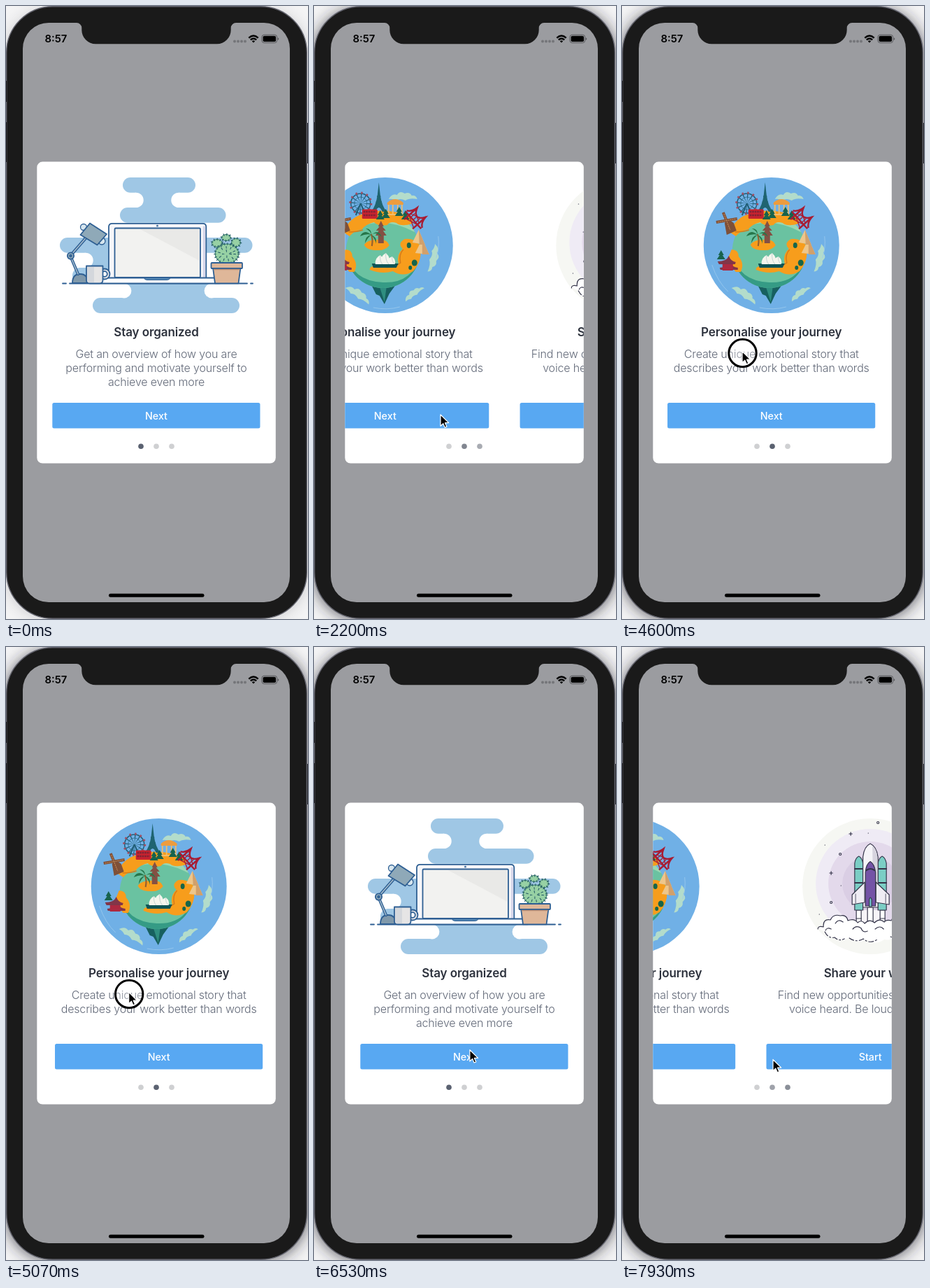
Animation of 432 by 876 pixels, one loop 8 s. Source, as an HTML page:

```html
<!DOCTYPE html>
<html lang="en">
<head>
<meta charset="utf-8">
<title>Onboarding cards</title>
<style>
html, body { margin: 0; width: 100%; height: 100%; overflow: hidden; background: #f4f4f5; }
svg { display: block; width: 100vw; height: 100vh; }
text { font-family: Inter, "Open Sans", sans-serif; text-anchor: middle; }
.title { font-size: 17px; font-weight: 600; fill: #2d323d; letter-spacing: -.1px; }
.body { font-size: 16px; font-weight: 300; fill: #626978; letter-spacing: -.18px; }
.label { font-size: 14.3px; font-weight: 500; fill: #fff; }
.ink { stroke: #2e5f93; stroke-width: 1.8; stroke-linejoin: round; stroke-linecap: round; }
.line { stroke: #35354a; stroke-width: 1.2; stroke-linejoin: round; stroke-linecap: round; }
</style>
</head>
<body>
<svg viewBox="0 0 432 876" preserveAspectRatio="none">
<defs>
  <clipPath id="card"><rect x="44.3" y="222.6" width="341.5" height="431" rx="8"/></clipPath>
  <clipPath id="globe"><circle cx="212" cy="350" r="53"/></clipPath>
  <filter id="soft" x="-20%" y="-20%" width="140%" height="140%"><feGaussianBlur stdDeviation="11"/></filter>
  <path id="tree" d="M0-9L4-2H2L6 4H-6L-2-2H-4Z" fill="#17634d"/>
  <path id="cloud" d="M-20 3Q-15-6-8-3Q-4-10 3-5Q10-8 13-2Q19-3 21 3Q10 1 4 5Q-4 1-9 5Q-14 2-20 3Z" fill="#b3dccb"/>
  <g id="cactus">
    <ellipse cx="302" cy="339" rx="7.500" ry="5.500"/><ellipse cx="315" cy="331" rx="6.500" ry="4.500"/>
    <ellipse cx="329" cy="338" rx="6.500" ry="6"/><ellipse cx="316" cy="354" rx="17" ry="14"/>
  </g>
</defs>

<rect width="432" height="876" fill="#f4f4f5"/>
<rect id="shadow" x="0" y="4" width="431" height="872" rx="66" fill="#23232c" filter="url(#soft)"/>
<path d="M431 167V225" stroke="#222227" stroke-width="3"/>
<rect x=".7" y=".7" width="429.6" height="874.6" rx="66" fill="#1a1a1a" stroke="#62636d" stroke-width="1.4"/>
<path d="M0 107V137M0 166V223" stroke="#17171a" stroke-width="2"/>
<rect x="24" y="24" width="382" height="828" rx="37" fill="#9b9ca0"/>
<path d="M101 23V24A7.300 7.300 0 0 1 108.300 31.300V34A20 20 0 0 0 128.300 54.300H301.700A20 20 0 0 0 321.700 34V31.300A7.300 7.300 0 0 1 329 24V23Z" fill="#1a1a1a"/>
<text x="71.5" y="52.2" font-size="14.8" font-weight="600">8:57</text>
<path d="M327 50.5H343" stroke="#747579" stroke-width="4" stroke-linecap="round" stroke-dasharray="0 5"/>
<g fill="none" stroke="#000" stroke-width="2.3">
  <path d="M347.3 45.6Q354 39.4 360.7 45.6M349.8 48.4Q354 44.6 358.2 48.4"/>
</g>
<path d="M351.8 50.2Q354 48.4 356.2 50.2L354 52.6Z"/>
<rect x="366" y="41.2" width="21.6" height="11.4" rx="3.2" fill="none" stroke="#55565a"/>
<rect x="367.6" y="42.8" width="18.4" height="8.2" rx="1.8"/>
<path d="M388.8 45V49Q390.3 48 390.3 47T388.8 45" fill="#55565a"/>
<rect x="147" y="839.8" width="136.5" height="5" rx="2.5"/>

<g clip-path="url(#card)">
<rect x="44" y="222" width="343" height="432" fill="#fff"/>
<g id="strip">

<g id="p0">
  <g fill="#9fc7e5">
    <rect x="167" y="245" width="104" height="21.8" rx="10.9"/>
    <rect x="186" y="266" width="61" height="23"/>
    <rect x="163" y="288" width="151.500" height="21.800" rx="10.9"/>
    <rect x="77" y="331" width="275.500" height="21.800" rx="10.9"/>
    <rect x="114" y="352" width="150" height="23"/>
    <rect x="95" y="374" width="160" height="22" rx="10.9"/>
    <rect x="169" y="396" width="125" height="22"/>
    <rect x="124" y="417" width="210" height="22" rx="11"/>
  </g>
  <g fill="#fff">
    <circle cx="186" cy="277.400" r="10.7"/><circle cx="247" cy="277.400" r="10.7"/>
    <circle cx="114" cy="363.400" r="10.7"/>
    <circle cx="169" cy="407" r="10.4"/><circle cx="294" cy="407" r="10.4"/>
  </g>
  <g class="ink" fill="none">
    <path d="M81 396.500H86M91 396.500H345M350 396.500H353"/>
    <path d="M95 396Q95 383 106 383T117 396Z" fill="#8099ab"/>
    <path d="M103 383L92 357L119 326" stroke-width="4.2"/>
    <path d="M103 383L92 357L119 326" stroke="#a9bfce" stroke-width="1.5"/>
    <circle cx="92.500" cy="357" r="4.600" fill="#8fa9b8"/><circle cx="92.500" cy="357" r="1.300"/>
    <circle cx="111" cy="316" r="4.500" fill="#d6e5ee" stroke-width="1.3"/>
    <circle cx="137" cy="336" r="5" fill="#d6e5ee" stroke-width="1.3"/>
    <path d="M120 310.500L144 326L130.500 341.500L106.500 327Z" fill="#8fa9b8"/>
    <path d="M147 389V315.500Q147 310.800 152 310.800H281.500Q286.300 310.800 286.300 315.500V389Z" fill="#f7f7fa"/>
    <path d="M283.300 388V316" stroke="#d6d5e9" stroke-width="3"/>
    <rect x="155.500" y="317.500" width="122.500" height="70.500" rx="1.500" fill="#ededeb"/>
    <path d="M157 319H192L276 364V387H157Z" fill="#f2f2f0" stroke="none"/>
    <path d="M192 319H276V363Z" fill="#e9e9e7" stroke="none"/>
    <circle cx="216.500" cy="314.200" r=".5"/>
    <path d="M120 388.500H313Q313 396.300 305 396.300H120Z" fill="#fff"/>
    <path d="M197.500 388.500H235Q234 391.500 230 391.500H202Q198 391.500 197.500 388.500Z" fill="#5588b5" stroke-width="1"/>
    <circle cx="141" cy="383" r="7.500" fill="#dfe0e4"/><circle cx="141" cy="383" r="3.800" fill="#fff"/>
    <path d="M115 371.500H138.500V392Q138.500 396.300 134 396.300H119Q115 396.300 115 392Z" fill="#e6e5e5"/>
    <path d="M116.500 373H126V395H119Q116.500 395 116.500 392Z" fill="#d4d7dc" stroke="none"/>
  </g>
  <use href="#cactus" fill="#97d1a4" stroke="#2f7568" stroke-width="1"/>
  <g fill="none" stroke="#1f5563" stroke-width="3.600" stroke-dasharray="1 3.300">
    <use href="#cactus"/>
    <g stroke-dasharray="1 5.500"><ellipse cx="316" cy="354" rx="11" ry="9"/><ellipse cx="316" cy="354" rx="5" ry="4"/></g>
  </g>
  <g class="ink" fill="#dfb799">
    <path d="M296 374H335.500L332.500 396.300H299Z"/><rect x="293.500" y="367" width="44.500" height="8" rx="1"/>
    <path d="M297.500 376.500H334" stroke="#b98d73" stroke-width="1.500"/>
  </g>
</g>

<g id="p1">
  <circle cx="215" cy="342" r="97" fill="#70b0e6"/>
  <use href="#cloud" x="240" y="273"/>
  <use href="#cloud" transform="translate(284 360) rotate(105)"/>
  <use href="#cloud" transform="translate(176 412) rotate(35)"/>
  <use href="#cloud" transform="translate(256 411) rotate(-35) scale(.8)"/>
  <g fill="none" stroke="#9ccbee" stroke-width=".8">
    <path d="M130 370Q138 394 153 408M198 431Q218 435 236 430M291 329Q293 345 288 360"/>
  </g>
  <path d="M194 396H232L221 411L214 426L207 414L202 412Z" fill="#17605f"/>
  <path d="M207 401L214 423L217 401Z" fill="#2f8e80"/>
  <circle cx="212" cy="350" r="53" fill="#6ac2a1"/>
  <g clip-path="url(#globe)">
    <path d="M160 355Q168 393 212 395T266 352V404H158Z" fill="#359b85"/>
    <path d="M165 320Q212 298 257 323V290H165Z" fill="#9bd7b2"/>
  </g>
  <g fill="#f79d1c">
    <path d="M155 323Q164 302 184 297Q214 287 246 299Q256 304 254 311Q238 316 231 310Q222 307 218 313Q205 315 199 309Q187 312 182 319Q171 321 164 329Z"/>
    <path d="M185 341Q190 334 202 334Q218 332 221 342Q215 350 203 349Q188 349 185 341Z"/>
    <path d="M243 333Q256 331 265 342Q269 364 255 379Q241 388 226 379Q211 384 193 377Q192 371 207 371Q227 375 234 368Q231 355 240 347Q232 339 243 333Z"/>
    <path d="M158 348Q168 348 168 358Q177 368 171 380L164 380Q154 370 154 358Z"/>
  </g>
  <path d="M163 323Q175 323 183 320M241 348Q234 355 237 367Q227 375 212 373" fill="none" stroke="#d57b19" stroke-width="1.500"/>
  <g fill="none" stroke="#225f77">
    <circle cx="180" cy="282" r="14" stroke-width="1.500"/>
    <circle cx="180" cy="282" r="9" stroke-width=".7"/>
    <circle cx="180" cy="282" r="7" stroke-width="14" stroke-dasharray=".800 2.865"/>
    <circle cx="180" cy="282" r="15" stroke="#a34c60" stroke-width="3" stroke-dasharray="2.500 5.354"/>
    <path d="M180 282L173 299M180 282L187 299" stroke-width="2"/>
  </g>
  <path d="M206 252L208 270Q210 285 217 294H211Q206 282 201 294H195Q202 285 204 270Z" fill="#1f6470"/>
  <path d="M202 280H210M203.500 272H208.500" stroke="#1f6470" stroke-width="2"/>
  <path d="M218 281Q229 271 241 281V284H218Z" fill="#ed9c3e"/>
  <path d="M220 284V297M226 284V297M233 284V297M239 284V297M217 298H242" stroke="#f1bd6d" stroke-width="1.800"/>
  <rect x="182" y="290.500" width="22" height="13.500" rx="1.500" fill="#c7232f"/>
  <path d="M184 294H202M184 299H202" stroke="#7f2334" stroke-width="2.300" stroke-dasharray="2.500 1"/>
  <use href="#tree" x="235" y="296"/><use href="#tree" x="216" y="299"/><use href="#tree" x="208" y="301"/><use href="#tree" x="244" y="301"/>
  <g transform="translate(258 303) rotate(48)" fill="none" stroke="#a81c33" stroke-width="2.400">
    <path d="M-16 4H17M-9-13V13M9-13V13M-16 2Q-10-2-9-12Q0 6 9-12Q10-2 17 2"/>
    <path d="M-9-8L9 1M-9 1L9-8M-9 11L9 4M-9 4L9 11M-5-4V4M0-2V4M5-4V4" stroke-width="1.300"/>
  </g>
  <g fill="#7e5038">
    <path d="M148 310L154 305L161 310L165 321L151 327Z"/>
    <path d="M136 309L166 304M146 295L157 322" stroke="#825037" stroke-width="4"/>
    <path d="M138 309L165 304M147 297L156 320" stroke="#c4935d" stroke-width="1" stroke-dasharray="2 1"/>
  </g>
  <g fill="#823548">
    <path d="M138 365Q151 365 154 357Q157 365 164 366L163 369H140Z"/>
    <path d="M141 374Q153 373 156 367Q159 373 167 374V377H142Z"/>
    <path d="M145 369H160V378H145Z" fill="#ad2940"/>
  </g>
  <use href="#tree" x="143" y="358"/>
  <path d="M209 307L213 315H211L216 321H212L217 328H213V339H205V328H201L206 321H202L207 315H205Z" fill="#845043"/>
  <path d="M196 343Q198 333 195 326" fill="none" stroke="#95602f" stroke-width="2.200"/>
  <path d="M195 327Q185 318 179 329Q188 325 195 327Q187 328 186 339Q191 330 195 327Q201 333 202 340Q204 330 195 327Q202 322 210 330Q206 318 195 327Q196 318 187 318Q194 321 195 327Z" fill="#26764a"/>
  <path d="M196 368H234L231 374H198Z" fill="#0f5456"/>
  <path d="M201 369Q200 360 208 356Q214 361 211 369ZM209 369Q207 358 216 353Q224 360 220 369ZM218 369Q218 360 225 358Q231 363 229 369Z" fill="#f5f5ed"/>
  <path d="M208 356Q207 364 211 369M216 353Q215 363 220 369M225 358Q224 365 229 369" fill="none" stroke="#c4d5d2"/>
  <path d="M254 338L263 320L272 341ZM258 353L268 333L278 355Z" fill="#edc68b"/>
  <path d="M263 320L272 341H264ZM268 333L278 355H268Z" fill="#d1a06b"/>
  <g fill="#16654a"><ellipse cx="249" cy="342" rx="3" ry="4"/><ellipse cx="257" cy="367" rx="4" ry="4.500"/><ellipse cx="251" cy="374" rx="2.500" ry="3"/></g>
</g>

<g id="p2">
  <circle cx="215" cy="342" r="97" fill="#f6f7f3"/>
  <circle cx="215" cy="338" r="78" fill="#efebf5"/>
  <circle cx="215" cy="338" r="60" fill="#e3d9eb"/>
  <circle cx="215" cy="338" r="40" fill="#dacee4"/>
  <g id="stars" class="line" fill="none"></g>
  <path d="M195 376H235V402H195Z" fill="#f7f4f8"/>
  <g class="line" fill="#fff">
    <path d="M195 376H202V400H195ZM229 376H236V400H229ZM211 372H219V400H211Z"/>
    <path d="M195 388H202M229 388H236"/>
    <path d="M192.700 376V309Q194 301 198.600 299Q203 301 204.500 309V376ZM226 376V309Q227.500 301 232 299Q236.500 301 238 309V376Z" fill="#7bcec5"/>
    <path d="M193 317H204M226 317H238M193 337H204M226 337H238" stroke-width="2"/>
    <path d="M204.500 372V300Q206 285 215 281Q224 285 226 300V372Z" fill="#f5f4f8"/>
    <path d="M218 284Q225 290 225 301V350H219Z" fill="#d7d4df" stroke="none"/>
    <path d="M207 336L189 354V368L207 365ZM223 336L242 354V368L223 365Z" fill="#efedf4"/>
    <path d="M208 370V322Q209 310 215 306.500Q221 310 222.500 322V370Z" fill="#7453a6"/>
    <path d="M209.500 319Q215 315 221 319" stroke-width="2.200" fill="none"/>
    <path d="M213.500 371V361Q215 355 217 361V371Z" fill="#72c6cc"/>
    <path d="M194 353V366M237 353V366" stroke-width=".8"/>
  </g>
  <path class="line" d="M140 403Q140 398 148 400Q147 388 158 390Q162 381 172 384Q181 382 183 391Q192 387 197 394Q202 389 207 395Q214 388 221 394Q228 387 235 393Q238 389 245 391Q249 381 259 384Q270 382 273 393Q282 390 283 400Q290 398 291 403" fill="#fff"/>
  <path d="M142 403H290Q279 406 276 412Q268 420 258 413Q245 420 235 418Q222 427 210 418Q198 425 185 416Q172 422 164 416Q151 417 151 407Z" fill="#fff"/>
  <g class="line" fill="none">
    <path d="M151 405Q153 400 159 403M165 395Q169 388 176 393M190 403Q195 397 202 402Q204 409 211 406M222 403Q229 397 234 403M253 395Q261 387 268 397M264 404Q270 400 276 405"/>
    <path d="M150 407Q155 417 164 415Q170 421 178 417M185 416Q195 423 205 417Q214 425 225 418M244 414Q254 418 261 411Q271 416 278 408" stroke-dasharray="7 3 2 3"/>
  </g>
</g>
</g>
<g id="dots"></g>
</g>

<g id="cursor">
  <circle id="ring" cx=".5" cy="2.500" r="19.700" fill="#fff" fill-opacity=".3" stroke="#000" stroke-width="3"/>
  <path d="M0 0V16.300L3.800 12.700L6.200 18.300L8.900 17.200L6.500 11.700H11.700Z" stroke="#fff" stroke-width="1.200" stroke-linejoin="round"/>
</g>
</svg>
<script>
const LOOP = 8000, PITCH = 341.5, PULL = 320, DRAG = 0.3, FOCUS = 800;
const $ = id => document.getElementById(id);
const clamp = v => Math.max(0, Math.min(1, v));
const smooth = v => { v = clamp(v); return v * v * (3 - 2 * v); };
const square = v => v * v;

const PAGES = [
  ["Stay organized", ["Get an overview of how you are", "performing and motivate yourself to", "achieve even more"], "Next"],
  ["Personalise your journey", ["Create unique emotional story that", "describes your work better than words"], "Next"],
  ["Share your work", ["Find new opportunities to make your", "voice heard. Be loud and proud!"], "Start"]
];
const text = (cls, y, str) => `<text class="${cls}" x="215" y="${y}">${str}</text>`;
PAGES.forEach(([title, lines, label], i) => {
  const page = $("p" + i);
  page.setAttribute("transform", `translate(${i * PITCH} 0)`);
  page.insertAdjacentHTML("beforeend",
    text("title", 471.5, title) +
    lines.map((s, k) => text("body", 503.2 + k * 20, s)).join("") +
    '<rect x="66.3" y="567" width="297.2" height="36.5" rx="2.5" fill="#58a8f2"/>' +
    text("label", 590.7, label));
});

const STARS = {
  "m-1.500 0a1.500 1.500 0 1 0 3 0a1.500 1.500 0 1 0-3 0": [[226, 251], [172, 296], [261, 313], [159, 365], [291, 374]],
  "m-2.200 0h4.400m-2.200-2.200v4.400": [[187, 267], [253, 268], [159, 323], [272, 346]],
  "h.3": [[150, 283], [212, 266], [282, 287], [142, 382], [254, 334], [264, 371], [173, 341]]
};
for (const [shape, spots] of Object.entries(STARS))
  $("stars").innerHTML += `<path d="${spots.map(p => "M" + p + shape).join("")}"/>`;

$("dots").innerHTML = [193, 215, 237].map(x => `<circle cx="${x}" cy="629.300" r="3.800"/>`).join("");
const dots = [...$("dots").children];

// Cursor stops: time, x, y, easing into the stop
const PATH = [
  [300, 300, 890], [1000, 184, 588], [1200, 181, 584], [2450, 181, 584], [3350, 153.500, 496],
  [3620, 153.500, 496], [3940, 256, 495, square], [4100, 260, 495], [4500, 172, 493.500],
  [5010, 172, 493.500], [5330, 273, 491.500, square], [5800, 273, 491.500],
  [6800, 212, 594], [7250, 212, 594], [7600, 216, 589.500], [LOOP, 216, 589.500]
];
const PRESSES = [[1200, 1300], [1970, 2066], [3480, 3950], [4540, 5340], [6890, 6985], [7640, 7735]];

function cursorAt(t) {
  const i = PATH.findIndex(k => k[0] > t);
  if (i < 1) return PATH[0].slice(1);
  const [t0, x0, y0] = PATH[i - 1], [t1, x1, y1, ease = smooth] = PATH[i];
  const k = ease((t - t0) / (t1 - t0));
  return [x0 + (x1 - x0) * k, y0 + (y1 - y0) * k];
}

// Finger pull, then the page settles by itself
function swipe(u) {
  if (u < PULL) return DRAG * square(clamp(u / PULL));
  return 1 - (1 - DRAG) * Math.exp((PULL - u) / 126);
}

function pageAt(t) {
  const tap = start => smooth((t - start) / 350);
  return tap(1300) + tap(2066) - swipe(t - 3620) - swipe(t - 5010) + tap(6985) + tap(7735);
}

function draw(t) {
  const page = pageAt(t), [x, y] = cursorAt(t);
  $("strip").setAttribute("transform", `translate(${-page * PITCH} 0)`);
  dots.forEach((dot, i) => {
    const on = clamp(1 - Math.abs(page - i));
    const mix = (off, full) => Math.round(off + (full - off) * on);
    dot.setAttribute("fill", `rgb(${mix(207, 90)},${mix(208, 97)},${mix(210, 112)})`);
  });
  // The window shadow deepens once the window has focus
  $("shadow").setAttribute("opacity", t < FOCUS ? 0.2 : 0.75);
  $("cursor").setAttribute("transform", `translate(${x} ${y})`);
  $("ring").setAttribute("visibility", PRESSES.some(([a, b]) => t >= a && t < b) ? "visible" : "hidden");
}

const begin = performance.now();
function tick(now) {
  draw(Math.max(0, now - begin) % LOOP);
  requestAnimationFrame(tick);
}
draw(0);
requestAnimationFrame(tick);
</script>
</body>
</html>
```
